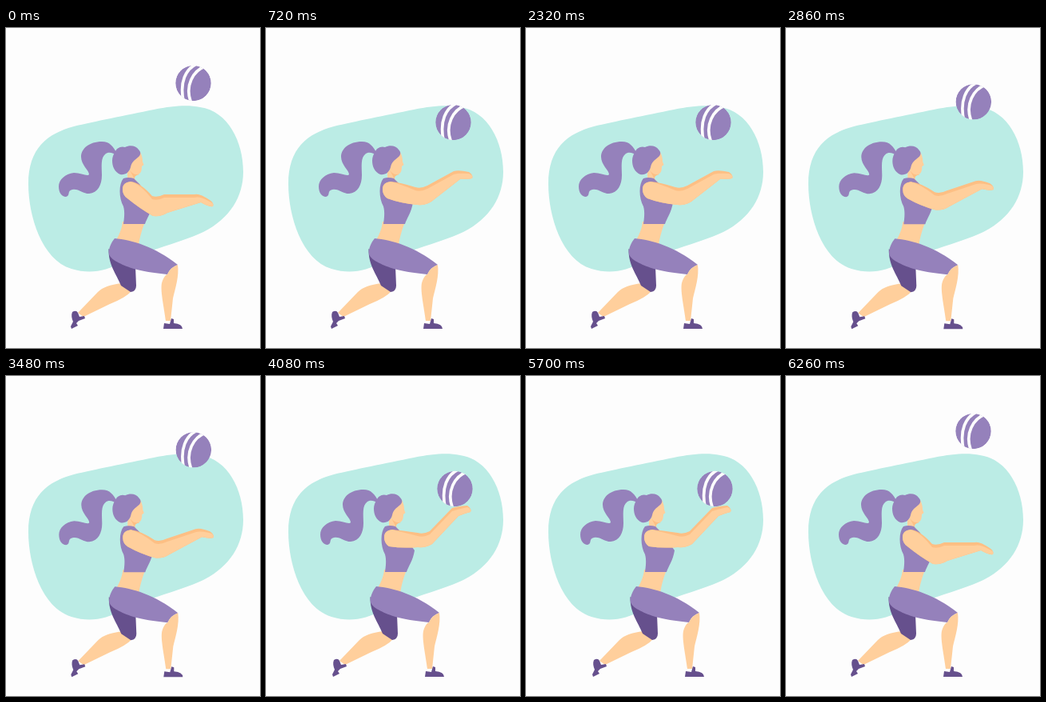
An HTML page that plays this animation: 318 px wide and 400 px high, repeating every 6300 ms.

```html
<!DOCTYPE html>
<html lang="en">
<head>
<meta charset="utf-8">
<title>Volleyball practice</title>
<style>
  html, body { margin: 0; width: 100%; height: 100%; overflow: hidden; background: #fdfdfd; }
  svg { display: block; width: 100vw; height: 100vh; }
  .purple { fill: #9581bb; }
  .dark { fill: #66508d; }
  .skin { fill: #ffcf9c; }
  .shade { fill: #fdbf84; }
</style>
</head>
<body>
<svg viewBox="0 0 318 400">
  <clipPath id="round"><circle r="22.3"/></clipPath>
  <path fill="#bbece5" d="M28 195C28 150 52 132 85 123C110 117 150 109 185 102C210 97 228 96 243 99C278 104 297 142 297 180C297 210 281 238 247 255C215 270 165 281 145 293C125 304 105 308 82 301C45 290 28 235 28 195Z"/>
  <g id="player">
    <!-- back leg, waist, shorts, front leg -->
    <path class="skin" d="M145 319C130 321 121 324 115 330L90 356L97 361L130 345Q150 337 157 329Z"/>
    <path class="skin" d="M146 242L174 242C171 251 168 258 166 272L136 268C141 260 145 252 146 242Z"/>
    <path class="dark" d="M128.500 276C128 296 138 307 144 322L156 330Q163 329 163 322L162 298Z"/>
    <path class="purple" d="M136 263C158 265 186 273 215 296Q206 299 202 308C185 306 170 304 160 301C148 297 132 291 129 283C128 275 132 268 136 263Z"/>
    <path class="skin" d="M215 296C217 310 212 325 209 338L206 366L200 366C198 350 193 328 195 319C197 311 201 308 202 308Q206 299 215 296Z"/>
    <path class="dark" d="M83 355Q88 352 90 356L92 361L98 360L99 363L91 366L88 369L90 372L82 376L81 373L84 367Q81 360 83 355ZM198 369L205 370L207 363L210 364L210 369Q221 370 221 376L197 376Z"/>
    <!-- neck, face and top -->
    <path class="skin" d="M152 177L166 183C160 185 160 188 163 191L169 197L152 196Z"/>
    <path class="shade" d="M155 178L167 183Q160 184 161 189Z"/>
    <path class="skin" d="M154 162L168 155C170 159 171 163 171 167L172.500 171L170 173C170 178 169 182 165 183Q158 184 154 176Z"/>
    <path class="purple" d="M147 188C141 195 141 212 147 223C149 230 148 238 147 245L174 245C176 238 182 231 184 218L167 195L160 188Q153 186 147 188Z"/>
    <!-- hair -->
    <path class="purple" d="M139 157C134 148 130 142 120 142C104 142 94 151 94 161C94 171 104 178 104 183C102 186 94 181 85 181C74 182 66 190 66 198C66 206 70 211 75 211C81 210 76 203 83 202C90 200 96 207 104 207C115 206 120 196 120 184C120 173 118 162 125 157C130 154 134 157 139 159Z"/>
    <path class="purple" d="M136 156C138 150 144 147 149 149C155 146 163 147 166 152C169 155 169 158 166 161C161 165 157 168 156 174C154 181 149 184 143 183C136 180 133 173 133 166C133 162 134 159 136 156Z"/>
    <path class="shade" id="far"/>
    <path class="skin" id="near"/>
    <g id="ball" clip-path="url(#round)">
      <circle class="purple" r="22.3"/>
      <path fill="none" stroke="#fdfdfd" stroke-width="3.7" d="M4 -24C-9 -18 -18 -2 -12 24M15 -21C0 -16 -11 3 -3 24"/>
    </g>
  </g>
</svg>
<script>
const LOOP = 6300, HOLD = 260;
const ORDER = [0, 1, 2, 3, 2, 1];

// elbow top, elbow bottom, wrist, fingertip, ball height, body shift
const POSES = [
  { top: [188, 211], low: [192, 236], wrist: [240, 207], tip: [260, 221], ball: 69, shift: [0, 0] },
  { top: [191, 206], low: [194, 228], wrist: [241, 190], tip: [260, 200], ball: 92, shift: [.3, .3] },
  { top: [192, 200], low: [197, 222], wrist: [239, 178], tip: [259, 186], ball: 118, shift: [0, 0] },
  { top: [193, 197], low: [196, 215], wrist: [235, 164], tip: [255, 168], ball: 141, shift: [2, 0] }
];

const el = id => document.getElementById(id);

// One arm from shoulder to hand; drop lowers its upper edge.
function arm({ top: [ux, uy], low: [lx, ly], wrist: [wx, wy], tip: [tx, ty] }, drop) {
  return `M146 202C146 195 150 193 156 192Q168 ${193 + drop / 2} ${ux - 5} ${uy - 1 + drop}` +
    `Q${ux + 2} ${uy + 1 + drop} ${ux + 10} ${uy - 3 + drop}L${wx - 4} ${wy + 1 + drop}` +
    `Q${wx + 2} ${wy - 1 + drop} ${tx - 5} ${ty - 6 + drop / 2}Q${tx + 1} ${ty - 2} ${tx - 1} ${ty + 2}` +
    `Q${tx - 6} ${ty + 3} ${wx + 4} ${wy + 11}L${lx + 10} ${ly - 5}` +
    `Q${lx + 3} ${ly} ${lx - 8} ${ly - 1}Q168 ${(ly + 212) / 2 + 2} 152 213Q146 209 146 202Z`;
}

let shown;
function draw(now) {
  const pose = POSES[ORDER[Math.floor(now % LOOP / HOLD) % ORDER.length]];
  if (pose !== shown) {
    shown = pose;
    el("player").setAttribute("transform", `translate(${pose.shift})`);
    el("far").setAttribute("d", arm(pose, 0));
    el("near").setAttribute("d", arm(pose, 4));
    el("ball").setAttribute("transform", `translate(234.5 ${pose.ball})`);
  }
}

const start = performance.now();
function tick() {
  draw(performance.now() - start);
  requestAnimationFrame(tick);
}
tick();
</script>
</body>
</html>
```
